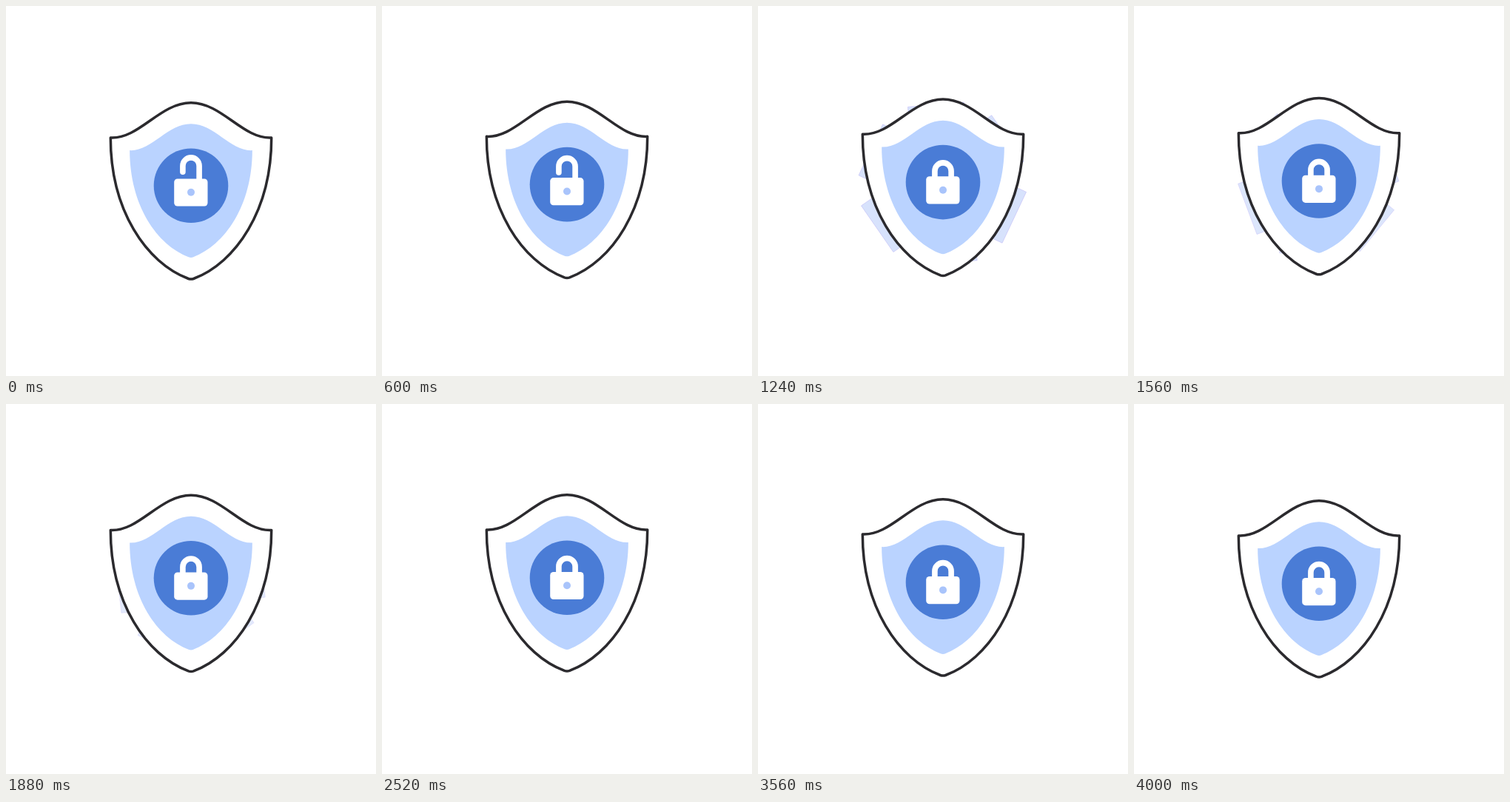
An HTML page that plays this animation: 500 px wide and 500 px high, repeating every 4040 ms.

```html
<!DOCTYPE html>
<html lang="en">
<head>
<meta charset="utf-8">
<title>Shield lock</title>
<style>
  html, body { margin: 0; width: 100%; height: 100%; overflow: hidden; background: #fff; }
  svg { display: block; width: 100%; height: 100%; }
</style>
</head>
<body>
<svg viewBox="0 0 500 500">
  <defs>
    <path id="shield" d="M141.3 178C180 180 208 130.8 250 130.8S320 180 358.7 178C358.7 276 310.5 347 253.5 368.5Q250 369.7 246.5 368.5C189.5 347 141.3 276 141.3 178Z"/>
    <rect id="bar" x="-107" y="-38" width="214" height="76"/>
  </defs>
  <g id="badge">
    <g id="rays" fill="#d7e2fc" stroke="#c9c6f8" stroke-width=".7">
      <use href="#bar"/>
      <use href="#bar" transform="rotate(60)"/>
      <use href="#bar" transform="rotate(120)"/>
    </g>
    <use href="#shield" fill="#fff" stroke="#2b2a2e" stroke-width="3.5" stroke-linejoin="round"/>
    <use href="#shield" fill="#bad3ff" transform="translate(59.5 60.2) scale(.762 .758)"/>
    <circle cx="250" cy="242.8" r="50.3" fill="#4a7cd6"/>
    <path id="shackle" d="M238.9 224.3V216a11.1 11.1 0 0 1 22.2 0V238" fill="none" stroke="#fff" stroke-width="7.6" stroke-linecap="round"/>
    <g id="body">
      <rect x="227.2" y="233.4" width="45.3" height="37.2" rx="4.5" fill="#fff"/>
      <circle cx="250" cy="251.8" r="5" fill="#a9c4fb"/>
    </g>
  </g>
</svg>
<script>
  const LOOP = 4040, STEP = 40;
  const PEAK = 2300, LIFT = 8.5;
  const RAY_RADIUS = 113.5;
  const [badge, rays, shackle, body] =
    ["badge", "rays", "shackle", "body"].map(id => document.getElementById(id));

  const progress = (t, from, to) => Math.min(1, Math.max(0, (t - from) / (to - from)));
  const smooth = u => u * u * (3 - 2 * u);
  const soft = u => 0.75 * smooth(u) + 0.25 * u;
  const shift = (el, y) => el.setAttribute("transform", `translate(0 ${y})`);

  function lift(t) {
    return t < PEAK
      ? LIFT * soft(t / PEAK)
      : LIFT * (1 - soft(progress(t, PEAK, LOOP) ** 1.1));
  }

  // Rays burst out as the lock closes, then slowly sink back behind the shield.
  function rayRadius(t) {
    return t < 1000
      ? 117.5 * (1 - (1 - progress(t, 560, 1000)) ** 2)
      : 117.5 - 0.0158 * (t - 1000);
  }

  function draw(t) {
    const closed = smooth(progress(t, 440, 1000));
    shift(badge, -lift(t));
    shift(shackle, 11.7 * closed);
    shift(body, 1.6 * closed);
    const angle = 30 + 180 * t / LOOP;
    const scale = rayRadius(t) / RAY_RADIUS;
    rays.setAttribute("transform", `translate(249.3 244.8) rotate(${angle}) scale(${scale})`);
    rays.setAttribute("opacity", 1 - 0.3 * progress(t, 1240, 1880));
  }

  const start = performance.now();
  function tick() {
    const t = (performance.now() - start) % LOOP;
    draw(Math.floor(t / STEP) * STEP);
    requestAnimationFrame(tick);
  }
  tick();
</script>
</body>
</html>
```
